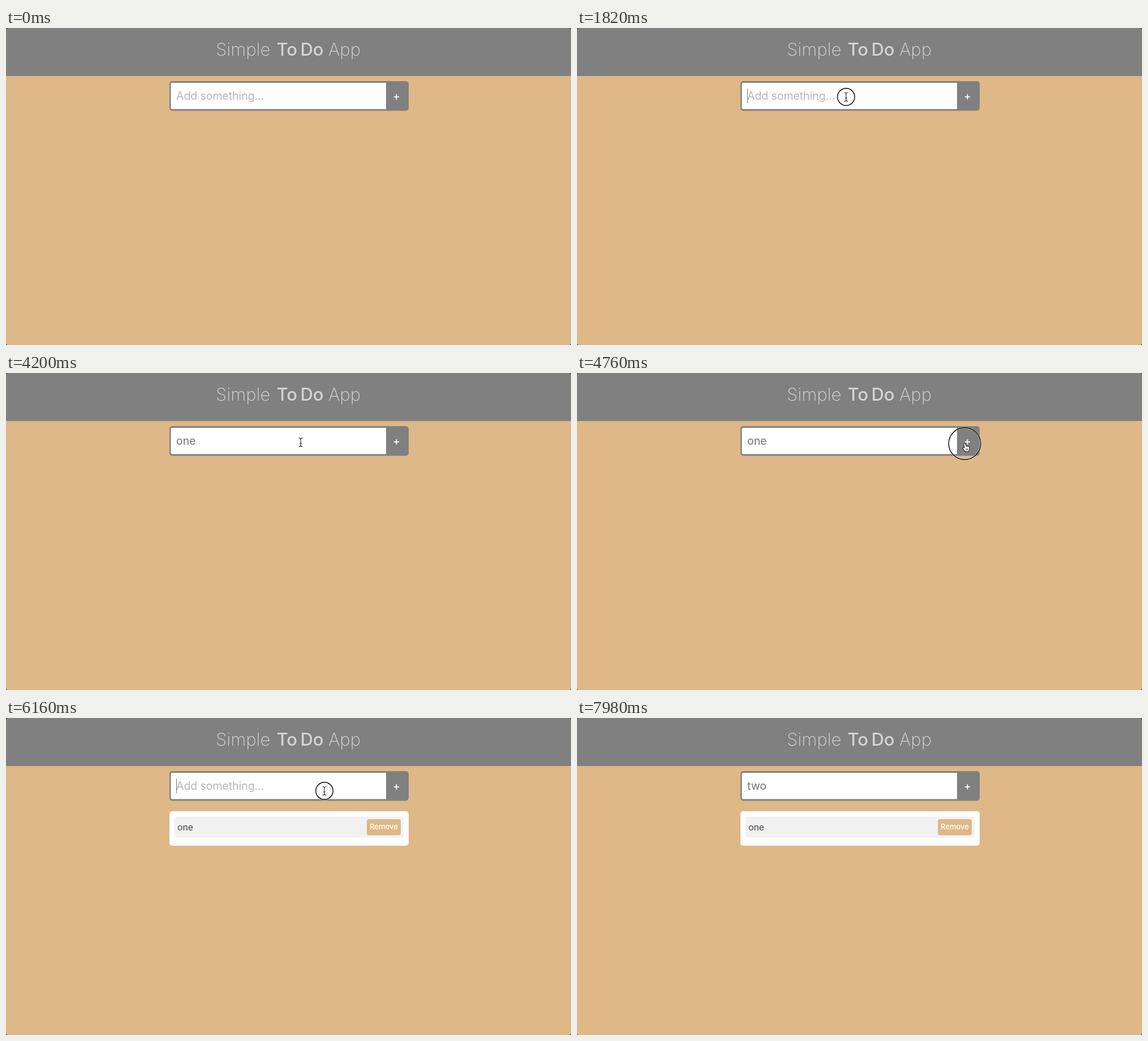
Write an HTML page with a canvas that moves like this. It is 999 px wide and 561 px high and loops after 8000 ms.

```html
<!DOCTYPE html>
<html lang="en">
<head>
<meta charset="utf-8">
<title>Simple To Do App</title>
<style>
  html, body { margin: 0; width: 100%; height: 100%; overflow: hidden; background: #deb887; }
  canvas { display: block; width: 100%; height: 100%; }
</style>
</head>
<body>
<canvas id="stage" width="999" height="561"></canvas>
<script>
const ctx = document.getElementById('stage').getContext('2d');
const LOOP = 8000, STEP = 70;
const FONT = 'Inter, "Open Sans", sans-serif';
const TAN = '#deb887', GRAY = '#808080';
const FIELD = { x: 301, base: 127, font: `400 19.4px ${FONT}` };

// [start, end, from, to, dip]
const moves = [
  [140, 420, [497, 508], [475, 88], 0],
  [490, 840, [475, 88], [475.8, 122], 0],
  [3990, 4690, [475.8, 122], [685.5, 125], 0],
  [4970, 5670, [685.5, 125], [563, 129], 7]
];
const shown = [[140, 2450], [3990, 6650]];
const clicks = [[910, 980, 15.2], [1820, 1960, 15.2], [4760, 4900, 28.3], [6160, 6230, 15.2]];
const carets = [[1820, 3010], [3640, 4200], [6160, 6790], [7630, 7980]];
const typing = [[2450, 'o'], [2730, 'on'], [2800, 'one'], [4900, ''], [6580, 't'], [7350, 'tw'], [7630, 'two']];

const during = (spans, t) => spans.find(s => t >= s[0] && t < s[1]);

function box(x, y, w, h, r, fill) {
  ctx.fillStyle = fill;
  ctx.beginPath();
  ctx.roundRect(x, y, w, h, r);
  ctx.fill();
}

function label(str, x, y, font, fill, align = 'left') {
  ctx.font = font;
  ctx.fillStyle = fill;
  ctx.textAlign = align;
  ctx.fillText(str, x, y);
}

function pointerAt(t) {
  let pos = moves[0][2];
  for (const [start, end, a, b, dip] of moves) {
    if (t < start) break;
    const p = Math.min(1, (t - start) / (end - start));
    const e = start === 140 ? 1 - (1 - p) ** 2 : p * p * (3 - 2 * p);
    pos = [a[0] + (b[0] - a[0]) * e, a[1] + (b[1] - a[1]) * e + dip * Math.sin(Math.PI * e)];
  }
  return pos;
}

function outline(path, fill, stroke, width) {
  ctx.lineJoin = ctx.lineCap = 'round';
  ctx.lineWidth = width;
  ctx.strokeStyle = stroke;
  ctx.stroke(path);
  if (fill) {
    ctx.fillStyle = fill;
    ctx.fill(path);
  }
}

const arrow = new Path2D('M0 0V13L3 10.2L5 15L7.2 14L5.2 9.4H9.3Z');
const beam = new Path2D('M-3 -7.5Q0 -7.5 0 -5.5Q0 -7.5 3 -7.5M0 -5.5V5.5M-3 7.5Q0 7.5 0 5.5Q0 7.5 3 7.5M-1.5 1.8H1.5');
const hand = new Path2D('M-1 1Q0 -.4 1.2 1L2.2 5Q3.2 4.2 4.1 5.2Q5.2 4.6 6 5.7Q7.7 5.2 8 7V10Q7.5 11.5 6.8 13.5H.7Q-.5 11.2 -2.6 8.7Q-2.9 7 -1.3 7.2L.1 8.3Z');
const knuckles = new Path2D('M2.2 9V11.5M4 9V11.5M5.8 9V11.5');

function drawPointer([x, y]) {
  ctx.save();
  ctx.translate(x, y);
  if (y < 94 || y > 146) {
    outline(arrow, '#000', '#fff', 1.6);
  } else if (x < 672) {
    outline(beam, null, 'rgba(255,255,255,.8)', 2.6);
    outline(beam, null, '#222', 1.1);
  } else {
    outline(hand, '#fff', '#111', 1.8);
    outline(knuckles, null, '#222', 0.8);
  }
  ctx.restore();
}

function drawRing([x, y], r) {
  const ring = new Path2D();
  ring.arc(x, y, r, 0, 7);
  outline(ring, null, 'rgba(255,255,255,.55)', 3);
  outline(ring, null, '#000', 1.4);
}

function drawHeader() {
  box(0, 0, 999, 85, 0, GRAY);
  const thin = `200 31px ${FONT}`, bold = `500 31px ${FONT}`, tint = '#d3d3d3';
  label('Simple', 371, 49, thin, tint);
  label('To', 478.5, 49, bold, tint);
  label('Do', 520.5, 49, bold, tint);
  label('App', 570, 49, thin, tint);
}

function drawField(t) {
  box(289, 94, 423, 52.5, 5, GRAY);
  box(291.5, 97, 380.5, 46.5, [2, 0, 0, 2], '#fff');
  label('+', 690.3, 126.5, `500 19px ${FONT}`, '#fff', 'center');
  const entry = typing.filter(e => t >= e[0]).pop();
  const value = entry ? entry[1] : '';
  label(value || 'Add something...', FIELD.x, FIELD.base, FIELD.font, value ? '#757575' : '#b6b6b6');
  if (during(carets, t)) {
    const w = value ? ctx.measureText(value).width : 0;
    ctx.fillStyle = '#777';
    ctx.fillRect(Math.round(FIELD.x + w), 107, 1, 26);
  }
}

function drawList() {
  box(289, 165, 423, 61, 5, '#fff');
  box(298, 174.5, 405, 37, 4, '#f1f1f1');
  label('one', 303, 198.5, `400 15.8px ${FONT}`, '#444');
  box(638, 179, 60, 28.5, 4, TAN);
  label('Remove', 668, 197.3, `500 13px ${FONT}`, '#fff', 'center');
}

function drawCorners() {
  ctx.fillStyle = '#3a3530';
  ctx.beginPath();
  ctx.rect(0, 0, 999, 561);
  ctx.roundRect(0, 0, 999, 561, 3.5);
  ctx.fill('evenodd');
}

function draw(now) {
  const t = Math.floor((now % LOOP) / STEP) * STEP;
  box(0, 0, 999, 561, 0, TAN);
  drawHeader();
  drawField(t);
  if (t >= 4900) drawList();
  if (during(shown, t)) {
    const pos = pointerAt(t);
    const click = during(clicks, t);
    if (click) drawRing(pos, click[2]);
    drawPointer(pos);
  }
  drawCorners();
}

let begin;
function tick(now) {
  begin ??= now;
  draw(now - begin);
  requestAnimationFrame(tick);
}
draw(0);
requestAnimationFrame(tick);
</script>
</body>
</html>
```
